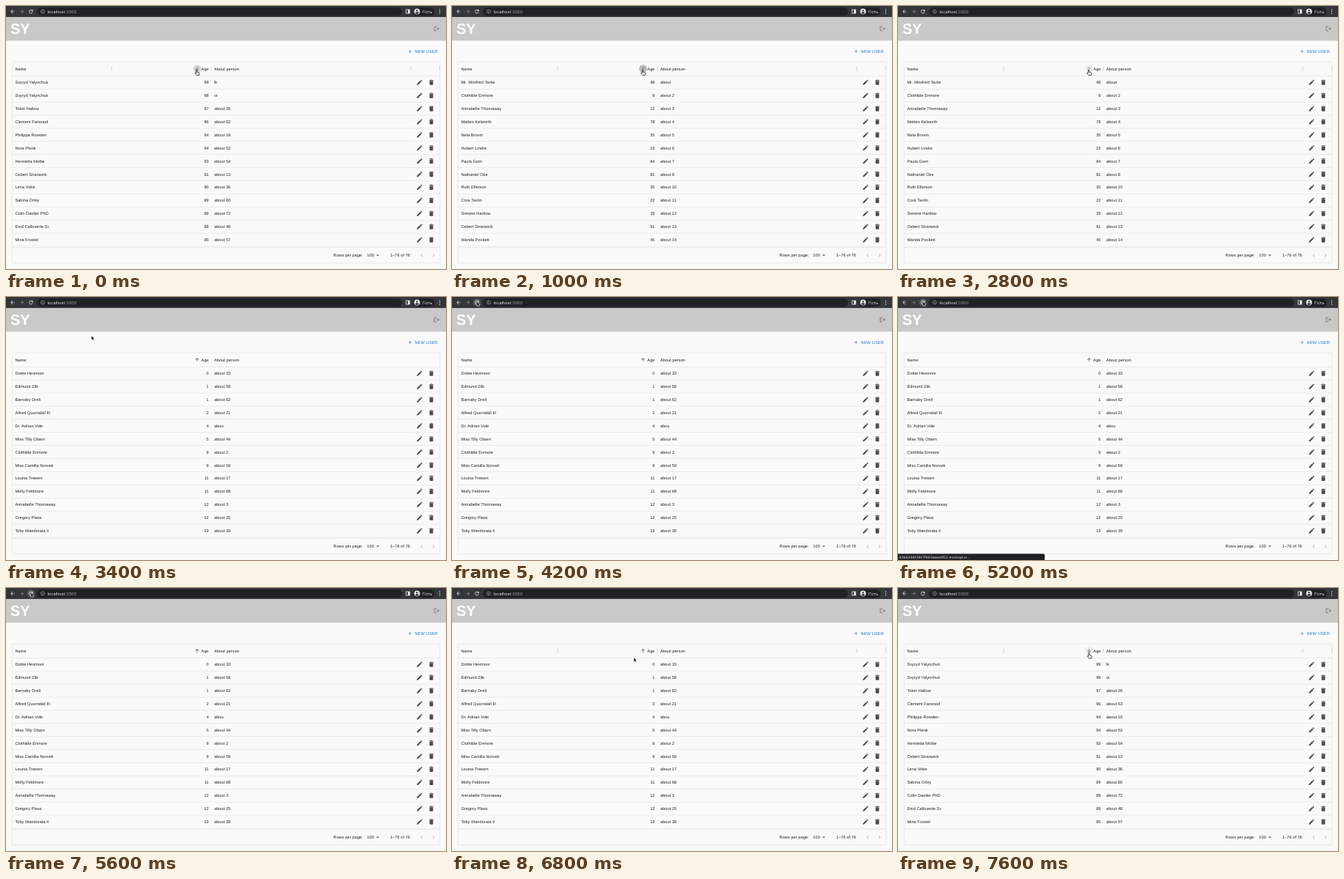
Write an HTML page that moves like this. It is 600 px wide and 359 px high and loops after 8 s.

```html
<!DOCTYPE html>
<html lang="en">
<head>
<meta charset="utf-8">
<title>User table</title>
<style>
  html, body { margin: 0; width: 100%; height: 100%; overflow: hidden; background: #fafafa; }
  svg { display: block; width: 600px; height: 359px; }
  text { font: 5.6px "Liberation Sans", Arial, sans-serif; letter-spacing: .0107em;
         text-rendering: geometricPrecision; fill: #1f1f1f; white-space: pre; }
  .ui { font-family: Inter, sans-serif; letter-spacing: 0; fill: #e8eaed; }
</style>
</head>
<body>
<svg id="stage" viewBox="0 0 600 359"></svg>
<script>
const LOOP = 8000, STEP = 200, ROW = 17.9, TOP = 95.3;

const ICONS = {
  edit: 'M3 17.25V21h3.75L17.81 9.94l-3.75-3.75L3 17.25zM20.71 7.04c.39-.39.39-1.02 0-1.41l-2.34-2.34c-.39-.39-1.02-.39-1.41 0l-1.83 1.83 3.75 3.75 1.83-1.83z',
  trash: 'M6 19c0 1.1.9 2 2 2h8c1.1 0 2-.9 2-2V7H6v12zM19 4h-3.5l-1-1h-5l-1 1H5v2h14V4z',
  logout: 'M17 7l-1.41 1.41L18.17 11H8v2h10.17l-2.58 2.58L17 17l5-5zM4 5h8V3H4c-1.1 0-2 .9-2 2v14c0 1.1.9 2 2 2h8v-2H4V5z',
  up: 'M4 12l1.41 1.41L11 7.83V20h2V7.83l5.58 5.59L20 12l-8-8-8 8z',
  back: 'M20 11H7.83l5.59-5.59L12 4l-8 8 8 8 1.41-1.41L7.83 13H20v-2z',
  reload: 'M17.65 6.35A8 8 0 1 0 19.73 14h-2.08A6 6 0 1 1 12 6c1.66 0 3.14.69 4.22 1.78L13 11h7V4l-2.35 2.35z',
  plus: 'M19 13h-6v6h-2v-6H5v-2h6V5h2v6h6v2z',
  left: 'M15.4 7.4L14 6l-6 6 6 6 1.4-1.4L10.8 12z',
  drop: 'M7 10l5 5 5-5z'
};

// name|age|about
const TABLES = {
  desc: `Svyryd Yalynchuk|99|lk
Svyryd Yalynchuk|98|oi
Tobin Hallow|97|about 28
Clement Farwood|96|about 63
Philippa Rowden|94|about 16
Nora Plenk|94|about 53
Henrietta Molbe|93|about 54
Osbert Stranwick|91|about 13
Lena Vobe|90|about 36
Sabina Orley|89|about 60
Colin Dastler PhD|89|about 72
Enid Calloverte Sr.|88|about 48
Mina Frostel|85|about 57`,
  none: `Mr. Winifred Tarbe|48|about
Clothilde Enmore|9|about 2
Annabelle Thornaway|12|about 3
Matteo Kelworth|78|about 4
Nela Brovin|35|about 5
Hubert Lindre|15|about 6
Paula Gorn|84|about 7
Nathaniel Oke|81|about 8
Ruth Ellerson|35|about 10
Cora Tavlin|22|about 11
Simone Hartlow|29|about 12
Osbert Stranwick|91|about 13
Wanda Pockett|45|about 14`,
  asc: `Dottie Hexmoor|0|about 33
Edmund Zilk|1|about 58
Barnaby Drell|1|about 62
Alfred Quorndall III|2|about 21
Dr. Adrian Vole|4|abou
Miss Tilly Obarn|5|about 44
Clothilde Enmore|9|about 2
Miss Camilla Norvek|9|about 59
Louisa Trewen|11|about 17
Molly Feldmore|11|about 68
Annabelle Thornaway|12|about 3
Gregory Plass|12|about 25
Toby Wandorata II|13|about 39`
};

// time, x, y of the pointer tip
const POINTER = [
  [0, 260, 87], [3000, 260, 87], [3200, 190, 72], [3400, 116.5, 53], [3600, 75, 32],
  [3800, 50, 17], [4000, 38, 9], [4200, 34, 6.5], [5800, 34, 6.5], [6000, 42, 12],
  [6200, 78, 30], [6400, 140, 56], [6600, 205, 82], [6800, 248, 95], [7000, 260.5, 88.5]
];
const CLICKS = [-200, 1000, 3000, 7200];

const text = (x, y, s, attrs = '') => `<text x="${x}" y="${y}" ${attrs}>${s}</text>`;
const rect = (x, y, w, h, fill, attrs = '') =>
  `<rect x="${x}" y="${y}" width="${w}" height="${h}" fill="${fill}" ${attrs}/>`;
const circle = (x, y, r, fill, attrs = '') =>
  `<circle cx="${x}" cy="${y}" r="${r}" fill="${fill}" ${attrs}/>`;
const icon = (name, x, y, size, fill, turn = 0) =>
  `<path d="${ICONS[name]}" fill="${fill}" transform="translate(${x} ${y}) rotate(${turn}) scale(${size / 24}) translate(-12 -12)"/>`;
const END = 'text-anchor="end"';

function browserBar() {
  return rect(0, 0, 600, 15.3, '#35363a') +
    rect(42, 2, 498, 11.2, '#202124', 'rx="5.6"') +
    icon('back', 9, 7.5, 8, '#e8eaed') +
    icon('back', 21.5, 7.5, 8, '#85878b', 180) +
    circle(34, 7.5, 5.4, '#56575b', 'id="reloadHover"') +
    icon('reload', 34, 7.5, 8, '#e8eaed') +
    circle(50, 7.5, 2.5, 'none', 'stroke="#bdc1c6" stroke-width=".6"') +
    rect(49.7, 7, .6, 2, '#bdc1c6') + rect(49.7, 5.9, .6, .6, '#bdc1c6') +
    text(56.5, 9.5, 'localhost<tspan fill="#9aa0a6">:3000</tspan>', 'class="ui"') +
    rect(545.4, 5, 5, 5, 'none', 'stroke="#e8eaed" stroke-width=".8"') +
    rect(548, 5, 2.4, 5, '#e8eaed') +
    rect(555, 2, 29.5, 11.2, '#202124', 'rx="5.6"') +
    circle(560.5, 7.5, 4, '#e8eaed') +
    circle(560.5, 6.3, 1.2, '#3c4043') +
    '<path d="M558 10q0-2 2.5-2t2.5 2q-2.5 1.8-5 0z" fill="#3c4043"/>' +
    text(567.8, 9.5, 'Гість', 'class="ui"') +
    [5, 7.5, 10].map(y => circle(591.5, y, .65, '#e8eaed')).join('');
}

function page() {
  return rect(0, 47, 600, .8, '#e4e4e4') +
    rect(0, 15.3, 600, 31.7, '#c9c9c9') +
    text(6, 38, 'SY', 'style="font-size:20px;font-weight:bold;fill:#fff;letter-spacing:0"') +
    icon('logout', 587.2, 31, 8.6, '#666') +
    icon('plus', 551, 62, 8, '#1976d2') +
    text(557.5, 64.1, 'NEW USER', 'style="fill:#1976d2;letter-spacing:.0286em"') +
    rect(8.2, 76.2, 583.6, 274.6, 'none', 'rx="1.6" stroke="#dedede" stroke-width=".6"') +
    text(12.4, 87.5, 'Name') + text(276.5, 87.5, 'Age', END) + text(284, 87.5, 'About person') +
    `<g id="separators">${[144, 280, 552, 591.4].map(x => rect(x - .3, 82.6, .6, 5.8, '#bbb')).join('')}</g>` +
    circle(260.6, 85.6, 5.4, '#000', 'id="ripple"') +
    `<g id="arrow">${icon('up', 0, 0, 7.6, '#555')}</g>` +
    rect(8, TOP - .3, 584, .6, '#dedede');
}

function rows(source) {
  return source.split('\n').map((line, i) => {
    const [name, age, about] = line.split('|'), y = TOP + ROW * (i + .5), base = y + 2;
    return text(12.4, base, name) + text(276.5, base, age, END) + text(284, base, about) +
      icon('edit', 564, y, 9.6, '#4c4c4c') + icon('trash', 580, y, 9.6, '#4c4c4c') +
      rect(8, y + ROW / 2 - .3, 584, .6, '#e2e2e2');
  }).join('');
}

function footer() {
  return rect(8, 329.4, 584, .6, '#dedede') +
    text(446.6, 342.4, 'Rows per page:') + text(492.3, 342.4, '100') +
    icon('drop', 507, 340.3, 9.6, '#555') +
    text(551, 342.4, '1–76 of 76', END) +
    icon('left', 567, 340.3, 9.6, '#b5b5b5') + icon('left', 583, 340.3, 9.6, '#b5b5b5', 180);
}

const $ = id => document.getElementById(id);
const show = (id, on) => $(id).setAttribute('visibility', on ? 'visible' : 'hidden');

$('stage').innerHTML = rect(0, 0, 600, 359, '#fafafa') + browserBar() + page() +
  Object.keys(TABLES).map(k => `<g id="${k}">${rows(TABLES[k])}</g>`).join('') + footer() +
  '<g id="status"><path d="M0 350.6H198q2 0 2 2V359H0z" fill="#202124"/>' +
  text(1.6, 356.8, '63b624601907f863aaeebf52.mockapi.io...', 'class="ui" style="font-size:4.8px"') + '</g>' +
  '<path id="pointer" d="M0 0V5.8L1.4 4.6 2.3 6.6 3.3 6.2 2.4 4.2H4.2z" fill="#000" stroke="#fff" stroke-width=".5"/>' +
  '<path id="hand" d="M-.7 .9c0-1.2 1.4-1.2 1.4 0V3.2l2.3.6q1 .3.8 1.4L3.3 7.6H0L-2.2 5q-.2-.9.6-.8l.9.5z" fill="#fff" stroke="#000" stroke-width=".7"/>';

function draw(t) {
  const [, x, y] = POINTER.findLast(p => p[0] <= t);
  const inHeader = y > 76, onSort = inHeader && x > 255;
  const sort = t < 1000 ? 'desc' : t < 3000 ? 'none' : t < 7200 ? 'asc' : 'desc';
  const sinceClick = t - CLICKS.findLast(c => c <= t);

  for (const key in TABLES) show(key, key === sort);
  show('separators', inHeader);
  show('ripple', onSort);
  $('ripple').setAttribute('opacity', .05 + .2 * Math.max(0, 1 - sinceClick / 400));
  $('arrow').setAttribute('transform', `translate(260.6 85.6) rotate(${sort === 'desc' ? 180 : 0})`);
  $('arrow').setAttribute('opacity', sort !== 'none' ? 1 : onSort ? .5 : 0);
  show('reloadHover', y < 8);
  show('status', t >= 5000 && t < 5400);
  show('hand', onSort);
  show('pointer', !onSort);
  for (const id of ['hand', 'pointer']) $(id).setAttribute('transform', `translate(${x} ${y})`);
}

function tick() {
  draw(Math.floor(performance.now() % LOOP / STEP) * STEP);
  requestAnimationFrame(tick);
}
tick();
</script>
</body>
</html>
```
